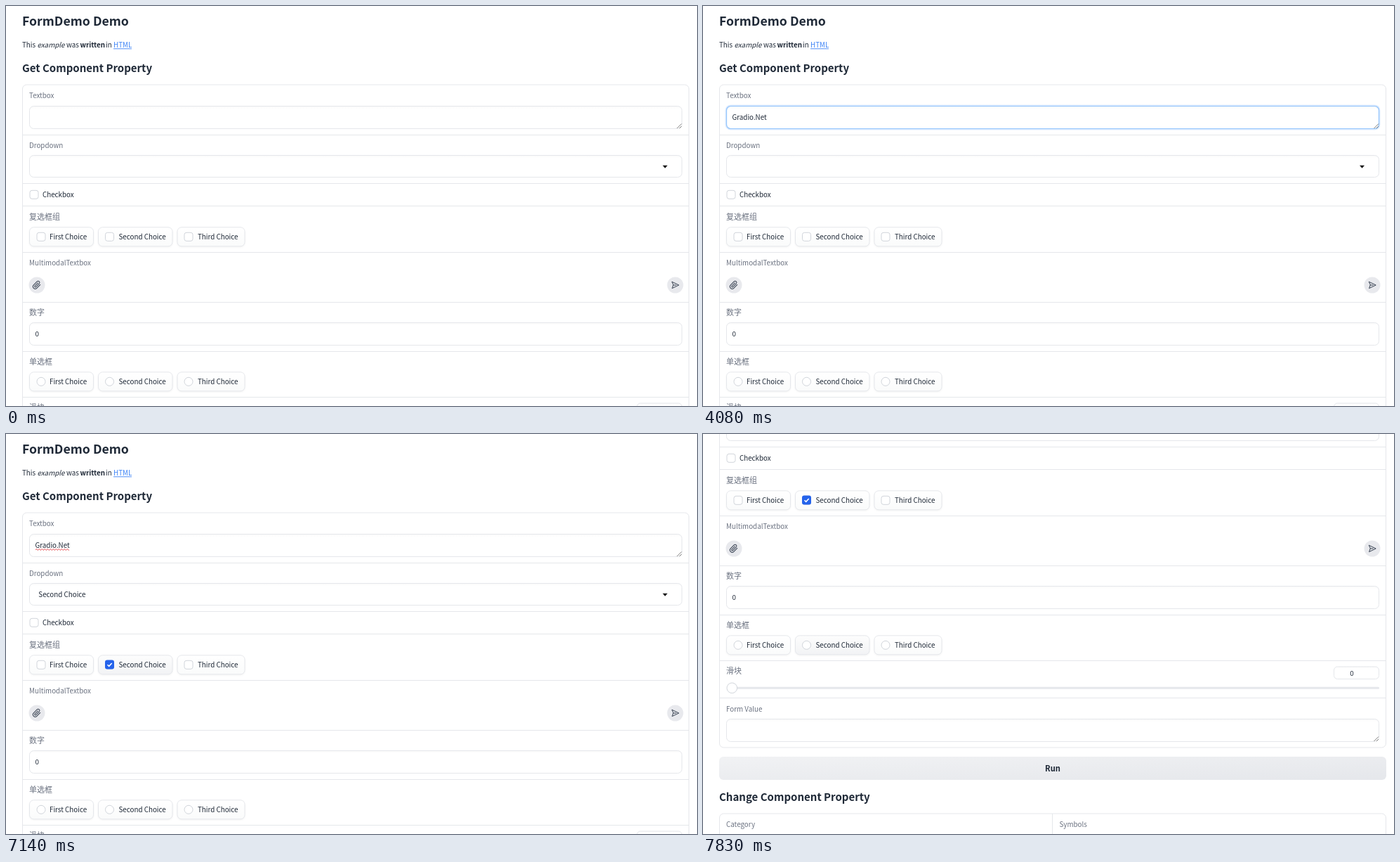
These frames come from a looping animation (984x569 px, 8000 ms). An HTML page:

```html
<!DOCTYPE html>
<html>
<head>
<meta charset="utf-8">
<title>FormDemo</title>
<style>
  html, body { margin: 0; width: 100%; height: 100%; overflow: hidden; background: #fff; }
  svg { display: block; width: 984px; height: 569px; }
  text {
    font: 9.8px "Noto Sans CJK SC", "Noto Sans CJK JP", "Noto Sans CJK", "Noto Sans", sans-serif;
    fill: #1f2937; white-space: pre;
  }
  .label { fill: #6b7280; }
  .cjk { font-size: 11px; fill: #6b7280; }
  .h1 { font-size: 17.7px; font-weight: 600; }
  .h2 { font-size: 15px; font-weight: 600; }
  .run { font-size: 11.2px; font-weight: 600; text-anchor: middle; }
  .bold { font-weight: 600; }
  .italic { font-style: italic; }
  .link { fill: #3b82f6; }
  .mid { text-anchor: middle; }
  .line { fill: none; stroke: #e5e7eb; }
  .field { fill: url(#inset); stroke: #e5e7eb; }
  .chip { fill: url(#soft); stroke: #e5e7eb; filter: drop-shadow(0 1px 1px rgba(0, 0, 0, .05)); }
  .chip.hover { fill: url(#hover); }
  .box { fill: #fff; stroke: #d1d5db; }
  .glow { fill: none; stroke: #dbeafe; stroke-width: 2; }
  .edge { fill: none; stroke: #93c5fd; stroke-width: 1.2; }
  .round { fill: #e8e9ed; }
  .icon { fill: none; stroke: #374151; stroke-linecap: round; stroke-linejoin: round; }
  .grip { fill: none; stroke: #6b6b6b; stroke-width: .9; }
  .caret { fill: #1f2937; }
  .menu { fill: #fff; filter: drop-shadow(0 1px 2px rgba(0, 0, 0, .1)); }
</style>
</head>
<body>
<svg viewBox="0 0 984 569">
  <defs>
    <linearGradient id="inset" x2="0" y2="1">
      <stop stop-color="#f9f9f9"/><stop offset=".12" stop-color="#fff"/>
    </linearGradient>
    <linearGradient id="soft" x2="0" y2="1">
      <stop stop-color="#fff"/><stop offset="1" stop-color="#fafbfb"/>
    </linearGradient>
    <linearGradient id="hover" x2="0" y2="1">
      <stop stop-color="#fdfdfd"/><stop offset="1" stop-color="#f2f3f5"/>
    </linearGradient>
    <linearGradient id="button" x2="1" y2="1">
      <stop stop-color="#f1f2f4"/><stop offset="1" stop-color="#e5e7eb"/>
    </linearGradient>
  </defs>
  <g id="page"></g>
</svg>
<script>
const $ = id => document.getElementById(id);
const text = (x, y, s, cls = '', id = '') => `<text x="${x}" y="${y}" class="${cls}" id="${id}">${s}</text>`;
const rect = (x, y, w, h, r, cls, id = '') =>
  `<rect x="${x}" y="${y}" width="${w}" height="${h}" rx="${r}" class="${cls}" id="${id}"/>`;
const path = (d, cls, id = '', extra = '') => `<path d="${d}" class="${cls}" id="${id}" ${extra}/>`;
const circle = (x, y, r, cls) => `<circle cx="${x}" cy="${y}" r="${r}" class="${cls}"/>`;
const field = (y, h) => rect(33.5, y, 929, h, 6, 'field');
const grip = y => path(`M955.5 ${y}l6.5-6.5M959 ${y}l3-3`, 'grip');
const ring = (y, h, id) =>
  `<g id="${id}">${rect(32.5, y - 1, 931, h + 2, 7, 'glow')}${rect(33.5, y, 929, h, 6, 'edge')}</g>`;

const choices = ['First Choice', 'Second Choice', 'Third Choice'];
const chipX = [33.5, 131.5, 244], chipW = [91, 105.5, 96], markX = [50, 147.5, 260], nameX = [62, 160.5, 273];

// A row of three option chips; mark draws the box or the radio dot.
const chips = (y, id, mark) => choices.map((name, i) =>
  rect(chipX[i], y, chipW[i], 27, 6, 'chip', id + i) + mark(markX[i], y + 13.5) +
  text(nameX[i], y + 17.3, name)).join('');
const square = (x, y) => rect(x - 6, y - 6, 12, 12, 3, 'box');
const dot = (x, y) => circle(x, y, 6, 'box');

let squiggle = 'M42 164.8';
for (let x = 42; x < 90; x += 4) squiggle += 'q1-2.4 2 -.6t2 -.2'.replace('t2 -.2', 'q1 2 2 .6');

const clip = 'M21.4 11l-9.2 9.2a6 6 0 0 1-8.5-8.5l9.2-9.2a4 4 0 0 1 5.7 5.7l-9.2 9.2a2 2 0 0 1-2.8-2.8l8.5-8.5';
const rows = [183, 252, 284.5, 350, 421, 491.5, 556, 609.5];

$('page').innerHTML = [
  text(23, 28, 'FormDemo Demo', 'h1'),
  text(23, 59.3, 'This'), text(44.5, 59.3, 'example', 'italic'), text(86, 59.3, 'was'),
  text(105.5, 59.3, 'written', 'bold'), text(142, 59.3, 'in'), text(153, 59.3, 'HTML', 'link'),
  path('M153 60.8h26', '', '', 'stroke="#3b82f6" stroke-width=".9"'),
  text(23, 94, 'Get Component Property', 'h2'),

  rect(23.5, 112, 949, 568, 6, 'line'),
  path(rows.map(y => `M24 ${Math.floor(y) + .5}h948`).join(''), 'line'),

  text(33, 131.3, 'Textbox', 'label'),
  field(142.5, 32), ring(142.5, 32, 'ring1'), grip(174),
  text(41.5, 161.8, '', '', 'typed'),
  path(squiggle, '', 'squiggle', 'fill="none" stroke="#e5484d" stroke-width=".9"'),
  rect(42, 152, 1, 13, 0, 'caret', 'caret1'),

  text(33, 202.2, 'Dropdown', 'label'),
  field(212.5, 31),
  path('M935 226.8h7l-3.5 4z', '', '', 'fill="#111"'),
  text(46.3, 231.8, 'Second Choice', '', 'value'),

  square(40, 268.3), text(52, 271.8, 'Checkbox'),

  text(33, 304, '复选框组', 'cjk'),
  chips(314.8, 'check', square),
  `<g id="tick">${rect(141, 321.5, 13, 13, 3, '')}` +
    path('M144.5 328.2l2.2 2.2 4-4.4', '', '', 'fill="none" stroke="#fff" stroke-width="1.6"') + '</g>',

  text(33, 369.3, 'MultimodalTextbox', 'label'),
  circle(44, 397, 11.5, 'round'), circle(953, 397, 11.5, 'round'),
  path(clip, 'icon', '', 'transform="translate(37.4 390.6) scale(.53)" stroke-width="1.9"'),
  path('M948.6 392.4l9.6 4.6-9.6 4.6 1.6-4.6zM950.2 397h4', 'icon'),

  text(33, 440.2, '数字', 'cjk'),
  field(450.5, 32), text(41.5, 470.3, '0'),

  text(33, 510.2, '单选框', 'cjk'),
  chips(520.8, 'radio', dot),

  text(33, 575, '滑块', 'cjk'),
  rect(898.5, 565, 64, 17.5, 5, 'field'), text(924, 577.8, '0', 'mid'),
  rect(41, 593.7, 922, 3, 1.5, '" fill="#e5e7eb'), circle(41.3, 595.3, 7.3, 'box'),

  text(33, 628.5, 'Form Value', 'label'),
  field(639.5, 32), grip(671),

  rect(23, 693, 950, 33, 6, '" fill="url(#button)'),
  text(498, 714, 'Run', 'run'),
  text(23, 755.5, 'Change Component Property', 'h2'),
  rect(23.5, 774, 949, 90, 6, 'line'), path('M497.5 774v90', 'line'),
  text(33, 793, 'Category', 'label'), text(507.5, 793, 'Symbols', 'label'),

  '<g id="menu">', rect(35, 242, 929, 84.5, 5, 'menu'),
  rect(35, 242, 929, 28.2, 4, '" fill="#f8f9fb'),
  choices.map((name, i) => text(51.7, 260 + 28.1 * i, name)).join(''), '</g>',
  ring(212.5, 31, 'ring2'),
  rect(47, 221, 1, 14, 0, 'caret', 'caret2')
].join('');
$('tick').firstChild.setAttribute('fill', '#2563eb');

const word = 'Gradio.Net';
const keys = [1590, 1800, 2010, 2370, 2550, 2670, 2940, 3300, 3510, 3630];
const show = (id, on) => $(id).setAttribute('visibility', on ? 'visible' : 'hidden');
const clamp = v => Math.min(1, Math.max(0, v));
const cubicOut = v => 1 - (1 - v) ** 3;

function render(now) {
  const t = Math.floor(now % 8000 / 30) * 30;
  const within = (a, b) => t >= a && t < b;

  const typed = $('typed');
  typed.textContent = word.slice(0, keys.filter(k => k <= t).length);
  const end = typed.textContent ? typed.getComputedTextLength() : .5;
  $('caret1').setAttribute('x', Math.floor(41.5 + end));
  show('caret1', within(750, 1230) || within(1590, 4080));
  show('ring1', within(750, 4560));
  show('squiggle', t >= 4560);

  show('ring2', within(4560, 5640));
  show('caret2', within(4560, 5160));
  show('value', t >= 5640);

  // The list flies in over 200 ms and leaves along the same curve reversed.
  const phase = t < 5590 ? clamp((t - 4657) / 200) : clamp((5790 - t) / 200);
  const open = cubicOut(phase);
  show('menu', open > 0);
  $('menu').setAttribute('opacity', open);
  $('menu').setAttribute('transform', `translate(0 ${4 * (1 - open)})`);

  show('tick', t >= 7140);
  $('check1').classList.toggle('hover', within(6900, 7740));
  $('radio1').classList.toggle('hover', t >= 7830);

  const ticks = [7740, 7770, 7830].filter(k => k <= t).length;
  $('page').setAttribute('transform', `translate(0 ${-78 * ticks})`);
}

const start = performance.now();
(function loop() {
  render(performance.now() - start);
  requestAnimationFrame(loop);
})();
</script>
</body>
</html>
```
